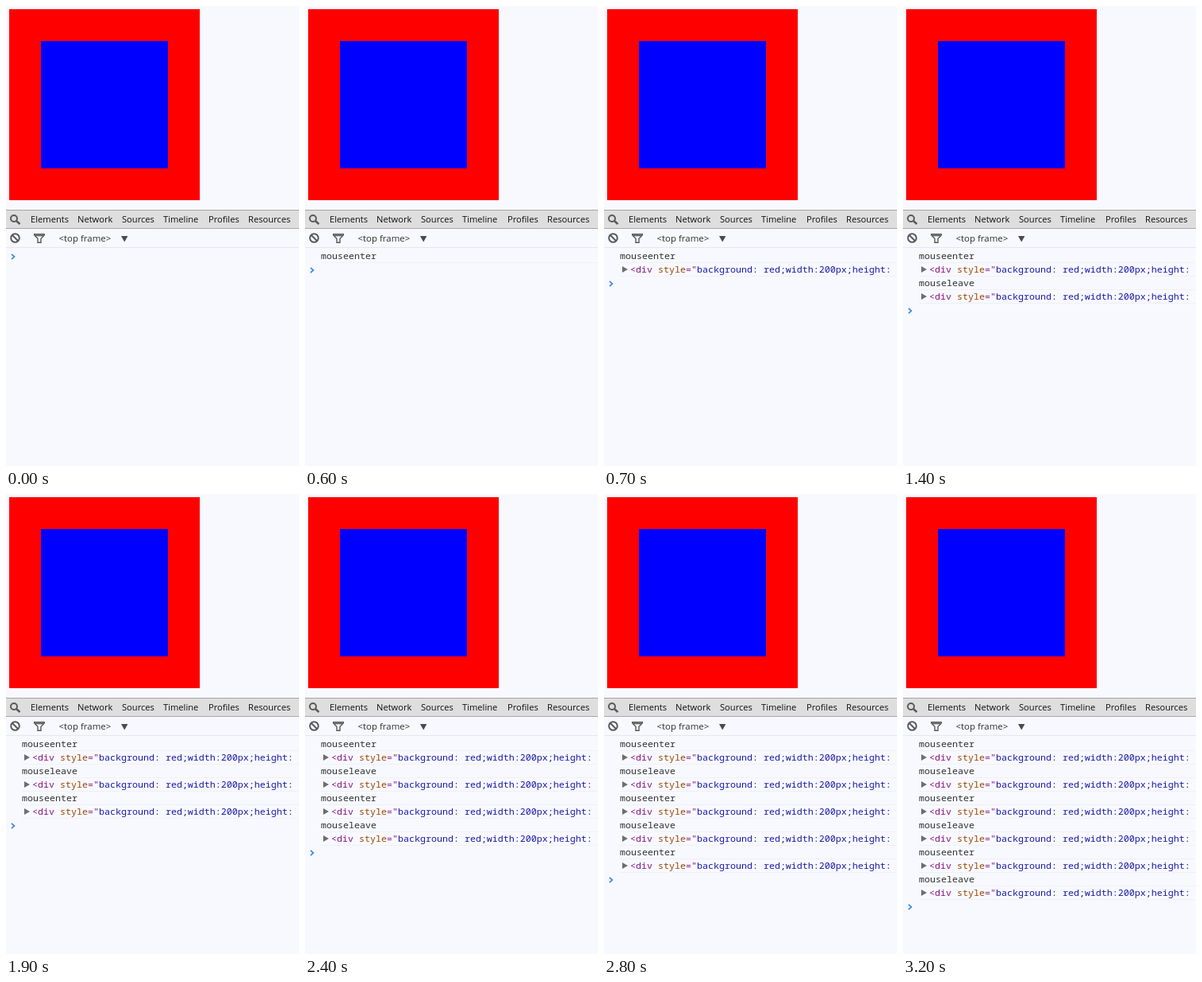
An HTML page for the animation above (4.5 s loop, 369x578 px).

```html
<!DOCTYPE html>
<html lang="en">
<head>
<meta charset="utf-8">
<title>Mouse events in the console</title>
<style>
  html, body { margin: 0; height: 100%; overflow: hidden; background: #f8f9ff; }
  svg { display: block; }
  text { white-space: pre; }
  .ui { font: 11.15px "Open Sans", sans-serif; fill: #111; }
  .log { font: 11.667px "Noto Sans Mono", monospace; fill: #303030; }
  .tag { fill: #881280; }
  .attr { fill: #994500; }
  .value { fill: #1a1aa6; }
  .icon { fill: none; stroke: #5a5a5a; stroke-width: 2; }
</style>
</head>
<body>
<svg width="369" height="578" viewBox="0 0 369 578">
  <rect x="4" y="4" width="240" height="240" fill="#f00"/>
  <rect x="44" y="44" width="160" height="160" fill="#00f"/>

  <rect y="256" width="369" height="24" fill="#a8a8a8"/>
  <rect y="257" width="369" height="22" fill="#dedede"/>
  <g class="icon">
    <circle cx="10" cy="267" r="4"/>
    <path d="M13 270l4.5 4" stroke-width="2.4"/>
    <circle cx="11.5" cy="291.5" r="5.3"/>
    <path d="M8 288l7 7"/>
    <path d="M35.7 286.7h12.6v1.2l-4.3 4.4v4.9h-4v-4.9l-4.3-4.4zM37 288.5h10" stroke-width="1.4"/>
  </g>
  <g id="tabs" class="ui"></g>
  <text class="ui" x="66.5" y="296" style="font-size:11.45px;fill:#303030">&lt;top frame&gt;</text>
  <path d="M145 289h8.4l-4.2 7.5z" fill="#4a4a4a"/>
  <rect y="303" width="369" height="1" fill="#e6e7ee"/>

  <g id="rows" class="log"></g>
  <path id="prompt" d="M7 311.8l3.5 3.2l-3.5 3.2" fill="none" stroke="#3d8ae6" stroke-width="1.7"/>
</svg>
<script>
const LOOP = 4500, ROW = 17;
const rowTimes = [600, 700, 1400, 1400, 1900, 1900, 2400, 2400, 2800, 2800, 3200, 3200];
const $ = id => document.getElementById(id);

const tabs = { Elements: 31, Network: 90, Sources: 146, Timeline: 198, Profiles: 255, Resources: 305 };
$("tabs").innerHTML = Object.entries(tabs)
  .map(([name, x]) => `<text x="${x}" y="272">${name}</text>`).join("");

const eventRow = name => `<text x="20" y="318">${name}</text>`;
const elementRow = `<path d="M23 327v8l7-4z" transform="translate(0 -17)" fill="#6e6e6e"/>
  <text x="33" y="318"><tspan class="tag">&lt;div </tspan><tspan class="attr">style</tspan><tspan
  class="tag">="</tspan><tspan class="value">background: red;width:200px;height:</tspan></text>`;

$("rows").innerHTML = rowTimes.map((_, i) => {
  const content = i % 2 ? elementRow : eventRow(i % 4 ? "mouseleave" : "mouseenter");
  return `<g transform="translate(0 ${i * ROW})">${content}
    <rect x="20" y="322" width="349" height="1" fill="#f0f0f4"/></g>`;
}).join("");
const rows = [...$("rows").children];

function draw() {
  const time = performance.now() % LOOP;
  const count = rowTimes.filter(start => start <= time).length;
  rows.forEach((row, i) => row.setAttribute("visibility", i < count ? "visible" : "hidden"));
  $("prompt").setAttribute("transform", `translate(0 ${count * ROW})`);
  requestAnimationFrame(draw);
}
draw();
</script>
</body>
</html>
```
